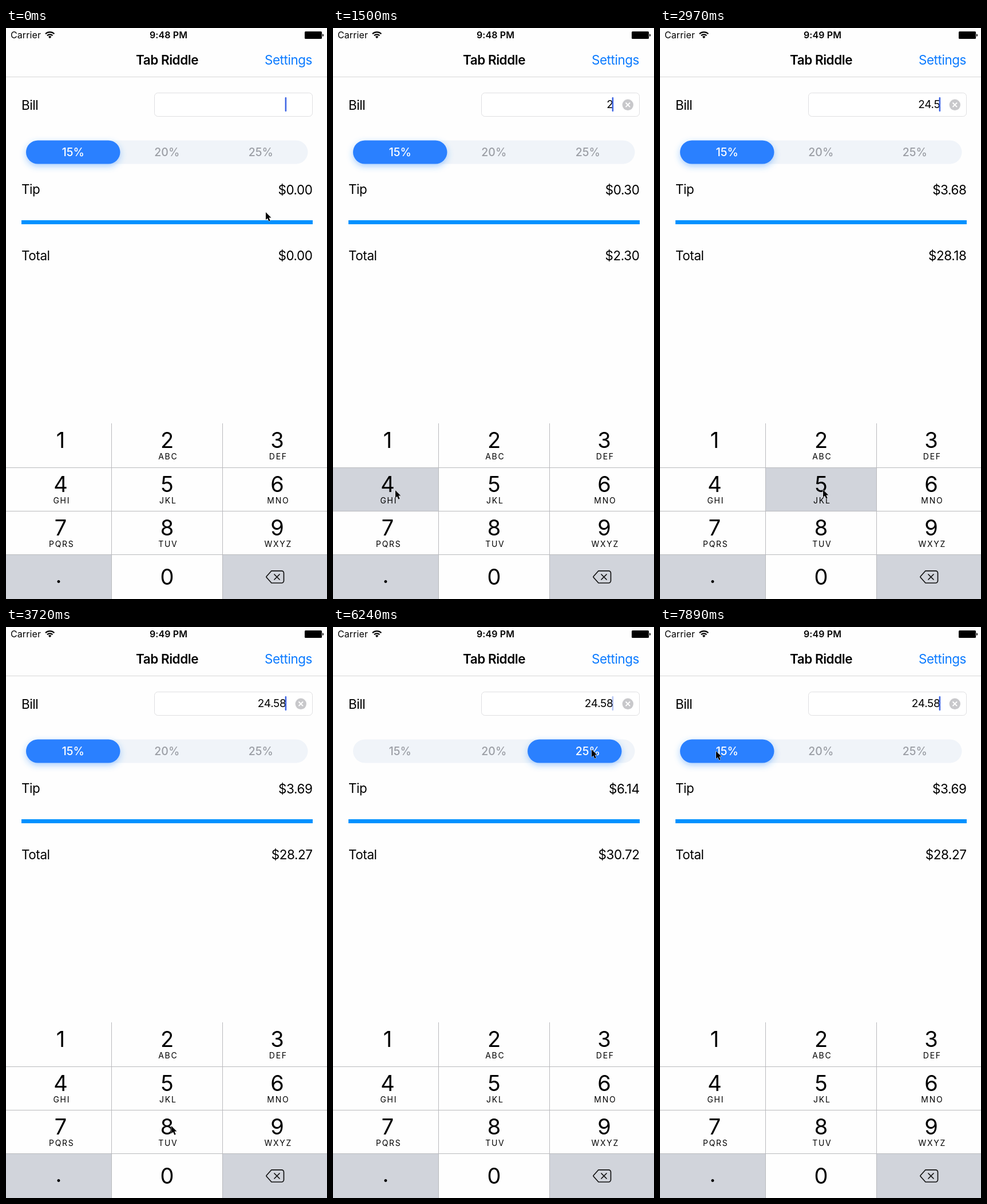
An HTML page for the animation above (8000 ms loop, 561 px wide and 998 px high).

```html
<!DOCTYPE html>
<html lang="en">
<head>
<meta charset="utf-8">
<title>Tip calculator</title>
<style>
  html, body { margin: 0; width: 100%; height: 100%; overflow: hidden; background: #fefefe; }
  svg { display: block; width: 100%; height: 100%; }
  text { font: 400 22.5px Inter, Roboto, sans-serif; letter-spacing: -.45px; white-space: pre; }
  .mid { text-anchor: middle; }
  .end { text-anchor: end; }
  .status { font-size: 16px; letter-spacing: .1px; }
  .bold { font-weight: 600; }
  .field { font-size: 19px; letter-spacing: -.3px; }
  .rate { font-size: 19.5px; font-weight: 500; letter-spacing: 0; }
  .digit { font-size: 38px; letter-spacing: 0; }
  .letters { font-size: 14px; letter-spacing: 1.7px; }
</style>
</head>
<body>
<svg viewBox="0 0 561 998">
  <defs>
    <filter id="glow" x="-30%" y="-80%" width="160%" height="260%">
      <feDropShadow dx="0" dy="4" stdDeviation="6" flood-color="#2e8cff" flood-opacity=".42"/>
    </filter>
    <clipPath id="pillClip"><rect class="pill" x="35" y="196.5" width="164.5" height="41" rx="20.5"/></clipPath>
  </defs>
  <rect width="561" height="998" fill="#fefefe"/>

  <text class="status" x="8" y="18">Carrier</text>
  <g fill="none" stroke="#000" stroke-width="2.2">
    <path d="M69 10.2a11 11 0 0 1 15.400 0M71.900 13.300a7 7 0 0 1 9.600 0"/>
    <path d="M76.700 18.200l-2.700-2.900a4 4 0 0 1 5.400 0z" fill="#000" stroke="none"/>
  </g>
  <text class="status bold mid" id="clock" x="284" y="18"></text>
  <rect x="522" y="6" width="30" height="13" rx="1.500"/>
  <path d="M553 10q2 .5 2 2.500t-2 2.500z"/>

  <text class="bold mid" x="281.500" y="63.500">Tab Riddle</text>
  <text class="end" x="535" y="63.500" fill="#0a7aff">Settings</text>
  <rect y="85" width="561" height="1" fill="#d6d6d8"/>

  <text x="27" y="142.700">Bill</text>
  <rect x="259.500" y="113.500" width="276" height="41" rx="6" fill="#fff" stroke="#dfdfe1"/>
  <text class="field end" id="bill" x="489.500" y="140.300"></text>
  <rect id="caret" x="487.600" y="121" width="2.600" height="25" rx="1" fill="#4067e4"/>
  <g id="clear">
    <circle cx="515.300" cy="134.300" r="9.700" fill="#c8c8cb"/>
    <path d="M511.500 130.500l7.600 7.600m0-7.600l-7.600 7.600" stroke="#fff" stroke-width="1.900"/>
  </g>

  <rect x="35" y="196.500" width="492.500" height="41" rx="20.500" fill="#f0f4f9"/>
  <g class="rates" fill="#9b9ea5"></g>
  <rect class="pill" x="35" y="196.500" width="164.500" height="41" rx="20.500" fill="#2b80ff" filter="url(#glow)"/>
  <g class="rates" fill="#fff" clip-path="url(#pillClip)"></g>

  <text x="27" y="290.300">Tip</text>
  <text class="end" id="tip" x="535.500" y="291"></text>
  <rect x="27" y="336" width="509" height="7" fill="#0091ff"/>
  <text x="27" y="406">Total</text>
  <text class="end" id="total" x="535.500" y="406"></text>

  <g id="keys"></g>
  <path d="M184.500 691V998M378.500 691V998M0 768.500H561M0 844.500H561M0 920.500H561" stroke="#b9babd"/>
  <path d="M464 948.800H481.500a4 4 0 0 1 4 4V966a4 4 0 0 1-4 4H464L455.300 960.300q-.8-.9 0-1.800z
           M468.500 954.500l10 10m0-10l-10 10" fill="none" stroke="#111" stroke-width="1.700" stroke-linejoin="round"/>

  <path id="pointer" d="M0 0V13.200L3 10.400L5.400 15.800L7.700 14.800L5.400 9.500H9.500Z" stroke="#fff" stroke-width="1" paint-order="stroke"/>
</svg>
<script>
const LOOP = 8000, TICK = 148.8, BLINK = 1050;
const $ = id => document.getElementById(id);

// Each list is ordered by tick.
const pointerPath = [[0, 454, 322], [5, 290, 722], [7, 290, 722], [10, 109, 808], [11, 109, 808],
  [14, 96, 958], [16, 96, 958], [18, 285, 807], [20, 285, 807], [23, 289, 872], [27, 289, 872],
  [32, 290, 211], [35, 290, 211], [39, 452, 214], [44, 452, 214], [50, 98, 217]];
const pillPath = [[33, 0], [34, .5], [35, 1], [40, 1], [41, 1.3], [42, 1.86], [43, 2], [51, 2], [52, .9], [53, 0]];
const typed = [[0, ''], [7, '2'], [11, '24'], [16, '24.'], [20, '24.5'], [24, '24.58']];
const rates = [[0, 15], [34, 20], [41, 25], [52, 15]];
const presses = [[0, ''], [6, '2'], [8, ''], [10, '4'], [12, ''], [14, '.'], [16, ''],
  [18, '5'], [21, ''], [23, '8'], [25, '']];

const label = (cls, x, y, text) => `<text class="${cls}" x="${x}" y="${y}">${text}</text>`;

for (const group of document.querySelectorAll('.rates'))
  group.innerHTML = [15, 20, 25].map((r, i) => label('rate mid', 117.3 + 164 * i, 224.3, r + '%')).join('');

const columns = [[0, 184, 95.5], [185, 193, 281.5], [379, 182, 474]];
const rowTops = [691, 769, 845, 921];
const letters = ['', 'ABC', 'DEF', 'GHI', 'JKL', 'MNO', 'PQRS', 'TUV', 'WXYZ'];
const keyRects = {};
const idleFill = key => '.<'.includes(key) ? '#d1d4db' : '#fefefe';
const pressedFill = key => '.<'.includes(key) ? '#fefefe' : '#d1d4db';

$('keys').innerHTML = [...'123456789.0<'].map((key, i) => {
  const [left, width, center] = columns[i % 3], row = Math.floor(i / 3), top = rowTops[row];
  const baseline = [733.5, 810.5, 886.5, 972.5][row];
  let out = `<rect data-key="${key === '<' ? 'del' : key}" x="${left}" y="${top}" width="${width}" height="77" fill="${idleFill(key)}"/>`;
  if (key === '.') out += label('digit mid', 92, 970, key);
  else if (key !== '<') out += label('digit mid', center, baseline, key);
  if (letters[i]) out += label('letters mid', center + 1.8, baseline + 20.8, letters[i]);
  return out;
}).join('');
for (const rect of document.querySelectorAll('[data-key]')) keyRects[rect.dataset.key] = rect;

const current = (list, tick) => list.filter(([at]) => at <= tick).pop()[1];

function along(path, tick, ease = k => k) {
  const next = path.findIndex(([at]) => at > tick);
  if (next < 0) return path[path.length - 1].slice(1);
  if (next === 0) return path[0].slice(1);
  const a = path[next - 1], b = path[next];
  const k = ease((tick - a[0]) / (b[0] - a[0]));
  return a.slice(1).map((v, i) => v + (b[i + 1] - v) * k);
}

const smooth = k => k * k * (3 - 2 * k);
const halfEven = x => x % 1 === .5 ? 2 * Math.round(x / 2) : Math.round(x);
const money = cents => '$' + (cents / 100).toFixed(2);

function caretOpacity(t) {
  if (t >= 1040 && t < 3700) return 1;
  const phase = (t < 1040 ? t : t - 5945) / BLINK;
  return Math.max(0, Math.min(1, .65 + 1.1 * Math.cos(2 * Math.PI * phase)));
}

function draw(t) {
  const tick = Math.floor((t + 10) / TICK);
  const bill = current(typed, tick);
  const cents = Math.round((parseFloat(bill) || 0) * 100);
  const tip = halfEven(cents * current(rates, tick) / 100);
  $('bill').textContent = bill;
  $('tip').textContent = money(tip);
  $('total').textContent = money(cents + tip);
  $('clock').textContent = tick < 17 ? '9:48 PM' : '9:49 PM';
  $('clear').setAttribute('visibility', bill ? 'visible' : 'hidden');
  $('caret').setAttribute('opacity', caretOpacity(tick * TICK));

  const pressed = current(presses, tick);
  for (const key of '123456789.0')
    keyRects[key].setAttribute('fill', key === pressed ? pressedFill(key) : idleFill(key));

  const [slot] = along(pillPath, tick);
  for (const pill of document.querySelectorAll('.pill')) pill.setAttribute('x', 35 + 164 * slot);

  const [x, y] = along(pointerPath, tick, smooth);
  $('pointer').setAttribute('transform', `translate(${x} ${y})`);
}

function loop() {
  draw(performance.now() % LOOP);
  requestAnimationFrame(loop);
}
loop();
</script>
</body>
</html>
```
